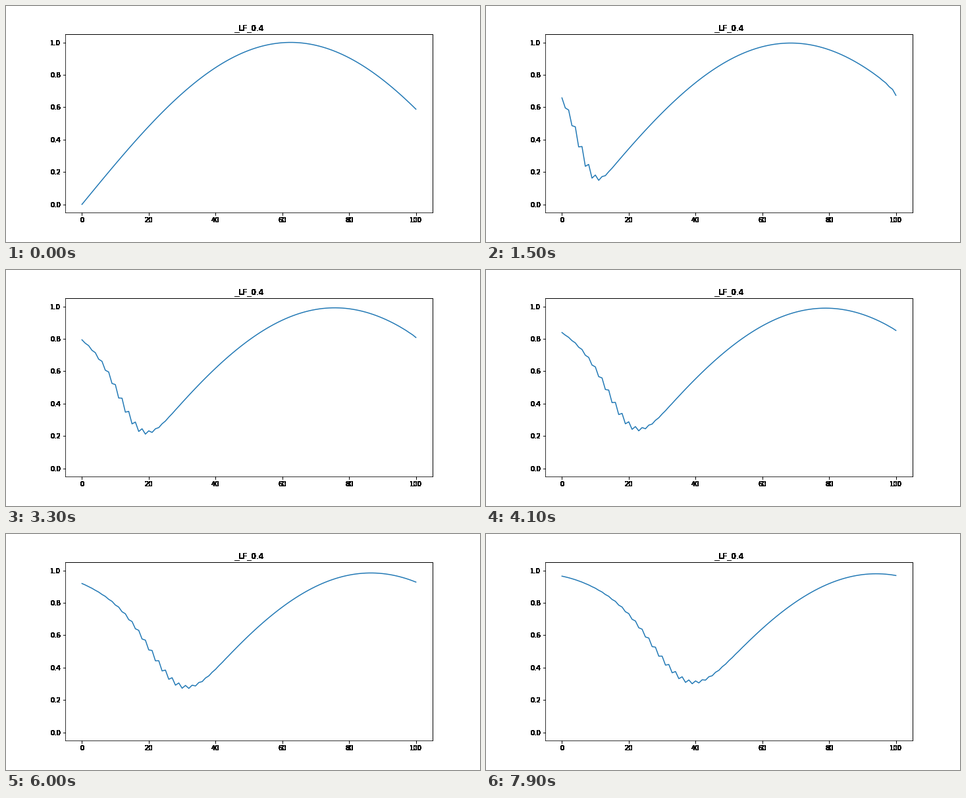
Recreate the animation shown at these times as a matplotlib script. Size 720 by 360 pixels, loop 8000 ms.

```python
import numpy as np
import matplotlib.pyplot as plt
from matplotlib.animation import FuncAnimation

CFL = 0.4
CELLS = 100
FRAMES = 80
INTERVAL = 100


def solve(u, c, steps):
    """Lax-Friedrichs advection on a periodic grid, one row per time step."""
    rows = [u]
    for _ in range(steps - 1):
        left, right = np.roll(u, 1), np.roll(u, -1)
        u = (left + right) / 2 - c / 2 * (right - left)
        rows.append(u)
    return rows


def solid(img, dpi):
    """Turn every touched pixel into opaque black, without soft edges."""
    out = np.zeros_like(img)
    out[..., 3] = img[..., 3] > 0
    return out, 0, 0


x = np.arange(CELLS + 1)
waves = solve(np.sin(0.8 * np.pi * x / CELLS), CFL, FRAMES)

plt.rcParams.update({"font.family": "DejaVu Sans", "font.size": 10})
fig, ax = plt.subplots(figsize=(10, 5), dpi=72, facecolor="white")
fig.subplots_adjust(left=0.125, right=0.9, bottom=0.125, top=0.88)
line, = ax.plot(x, waves[0], color="#1f77b4", lw=1.5)
title = ax.set_title(f"_LF_{CFL}", fontsize=12)

for artist in (title, ax.xaxis, ax.yaxis, ax.spines["top"], ax.spines["right"]):
    artist.set_agg_filter(solid)


def update(i):
    line.set_ydata(waves[i])
    return line,


anim = FuncAnimation(fig, update, frames=FRAMES, interval=INTERVAL,
                     repeat=True, repeat_delay=0, blit=False)
plt.show()
```
